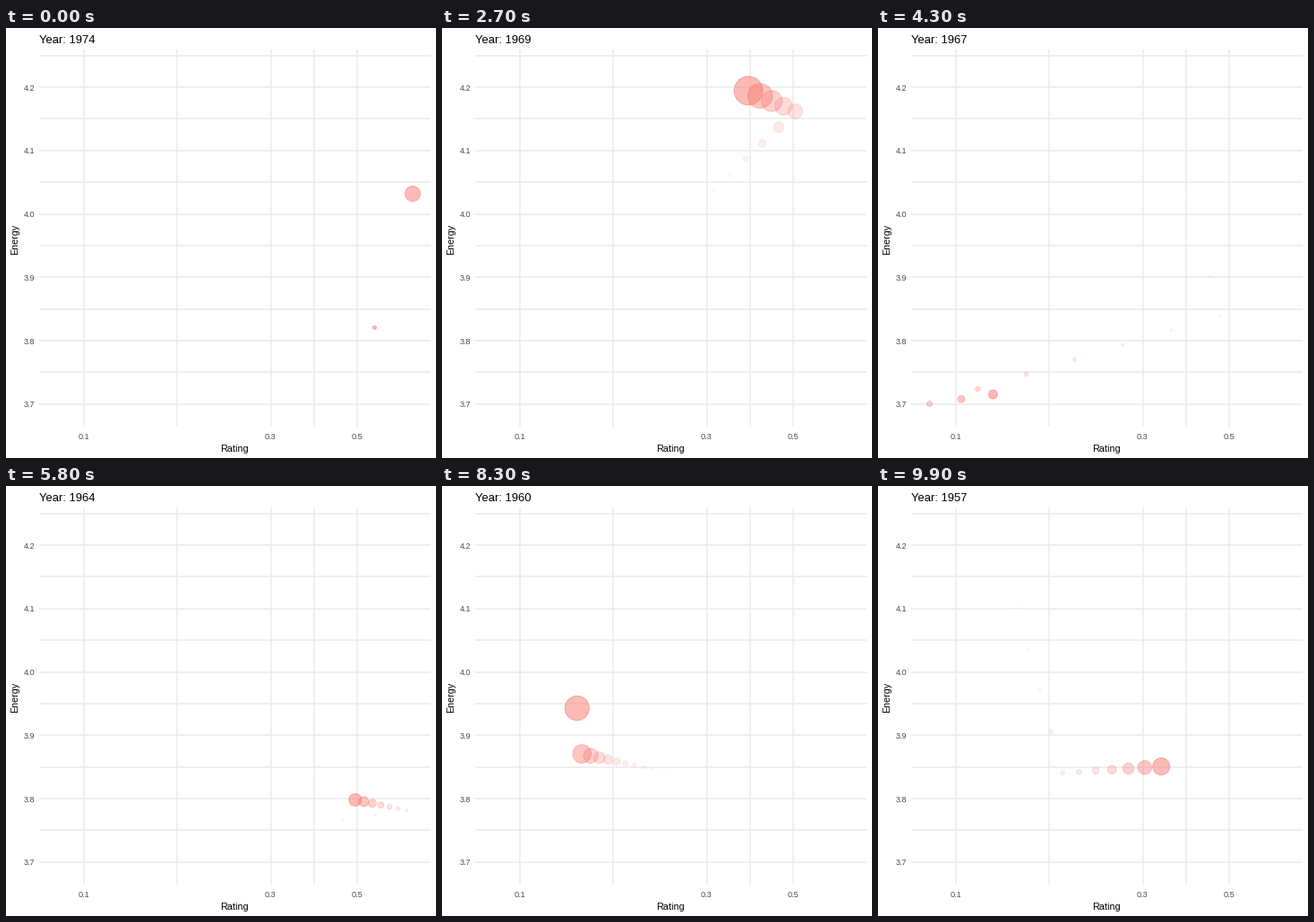
Write a matplotlib script that moves like this. It is 480 px wide and 480 px high and loops after 10000 ms.

```python
import numpy as np
import matplotlib.pyplot as plt
from matplotlib.animation import FuncAnimation

plt.rcParams["font.family"] = "Liberation Sans"

FRAMES, WAKE = 100, 20
DPI = 100
PX = 72 / DPI  # points per pixel
CORAL = np.array([0xF8, 0x76, 0x6D]) / 255
GRID, TICK = "#EBEBEB", "#4D4D4D"

# Main bubble: time step, x, y, diameter (stage pixels)
KEYS = np.array([
    (0, 454, 185, 16.4), (12, 424.2, 249.3, 19), (17, 284.2, 199.5, 18),
    (23, 394.3, 93, 38), (29, 316, 58.5, 28), (35, 381.3, 320.8, 12),
    (41, 57.5, 419.5, 8.4), (47, 270.3, 388, 11.2), (52, 447.3, 362, 10.3),
    (58, 389.8, 350.3, 13.4), (82, 156.2, 299, 24.6), (87, 129, 44, 35),
    (93, 206.2, 320.3, 16.2), (99, 316.2, 313, 18.4),
])

# Short-lived second bubbles: start, end, then the keys they follow
EXTRAS = [
    (0, 12, [(0, 411.5, 334.5)]),
    (29, 41, [(29, 300, 338), (35, 230, 428)]),
    (87, 99, [(87, 220, 409), (93, 439, 331)]),
]
EXTRA_SIZE = 3.2


def tween(keys, t):
    keys = np.asarray(keys, float)
    return [np.interp(t, keys[:, 0], col) for col in keys[:, 1:].T]


def bubbles(f):
    """Rows of x, y, diameter, alpha; oldest wake first, live bubbles last."""
    rows = []
    for k in range(min(f, WAKE) - 1, 0, -1):
        fade = ((min(f, WAKE) - k) / WAKE) ** 4
        x, y, d = tween(KEYS, f - k)
        rows.append((x, y, d * fade, 0.5 * fade))
    rows.append((*tween(KEYS, f), 0.5))
    for start, end, keys in EXTRAS:
        if start <= f < end:
            rows.append((*tween(keys, f), EXTRA_SIZE, 0.5))
    return np.array(rows)


fig = plt.figure(figsize=(480 / DPI, 480 / DPI), dpi=DPI, facecolor="white")
ax = fig.add_axes([0, 0, 1, 1])
ax.set(xlim=(0, 480), ylim=(480, 0))
ax.axis("off")


def label(x, y, s, px, color="black", **kw):
    return ax.text(x, y, s, fontsize=px * PX, color=color, **kw)


def x_pos(rating):
    return 87.4 + 436.3 * np.log10(rating / 0.1)


def y_pos(energy):
    return 207.5 - 707.5 * (energy - 4)


line = dict(color=GRID, linewidth=1.5 * PX, zorder=1)
x_major = [x_pos(v) for v in (0.1, 0.3, 0.5)]
x_minor = [np.mean(x_major[:2]), np.mean(x_major[1:])]
ax.vlines(x_major + x_minor, 24, 445, **line)
ax.hlines([y_pos(3.7 + 0.05 * i) for i in range(12)], 37, 474, **line)

for x, v in zip(x_major, (0.1, 0.3, 0.5)):
    label(x - 0.4, 459, f"{v}", 9.2, TICK, ha="center")
for i in range(6):
    v = 3.7 + 0.1 * i
    label(32, y_pos(v) + 3.6, f"{v:.1f}", 9.2, TICK, ha="right")

label(255, 473, "Rating", 10.8, ha="center")
label(15, 236, "Energy", 10.8, rotation=90, ha="right", va="center")
title = label(37, 17, "", 13)
dots = ax.scatter([], [], linewidths=PX, zorder=2)


def update(f):
    rows = bubbles(f)
    rgba = np.column_stack([np.tile(CORAL, (len(rows), 1)), rows[:, 3]])
    dots.set_offsets(rows[:, :2])
    dots.set_sizes(((rows[:, 2] + 0.7) * PX) ** 2)
    dots.set_facecolors(rgba)
    dots.set_edgecolors(rgba)
    title.set_text(f"Year: {round(1974 - 17 * f / (FRAMES - 1))}")
    return dots, title


anim = FuncAnimation(fig, update, frames=FRAMES, interval=100,
                     init_func=lambda: update(0), repeat=True, repeat_delay=0)
plt.show()
```
